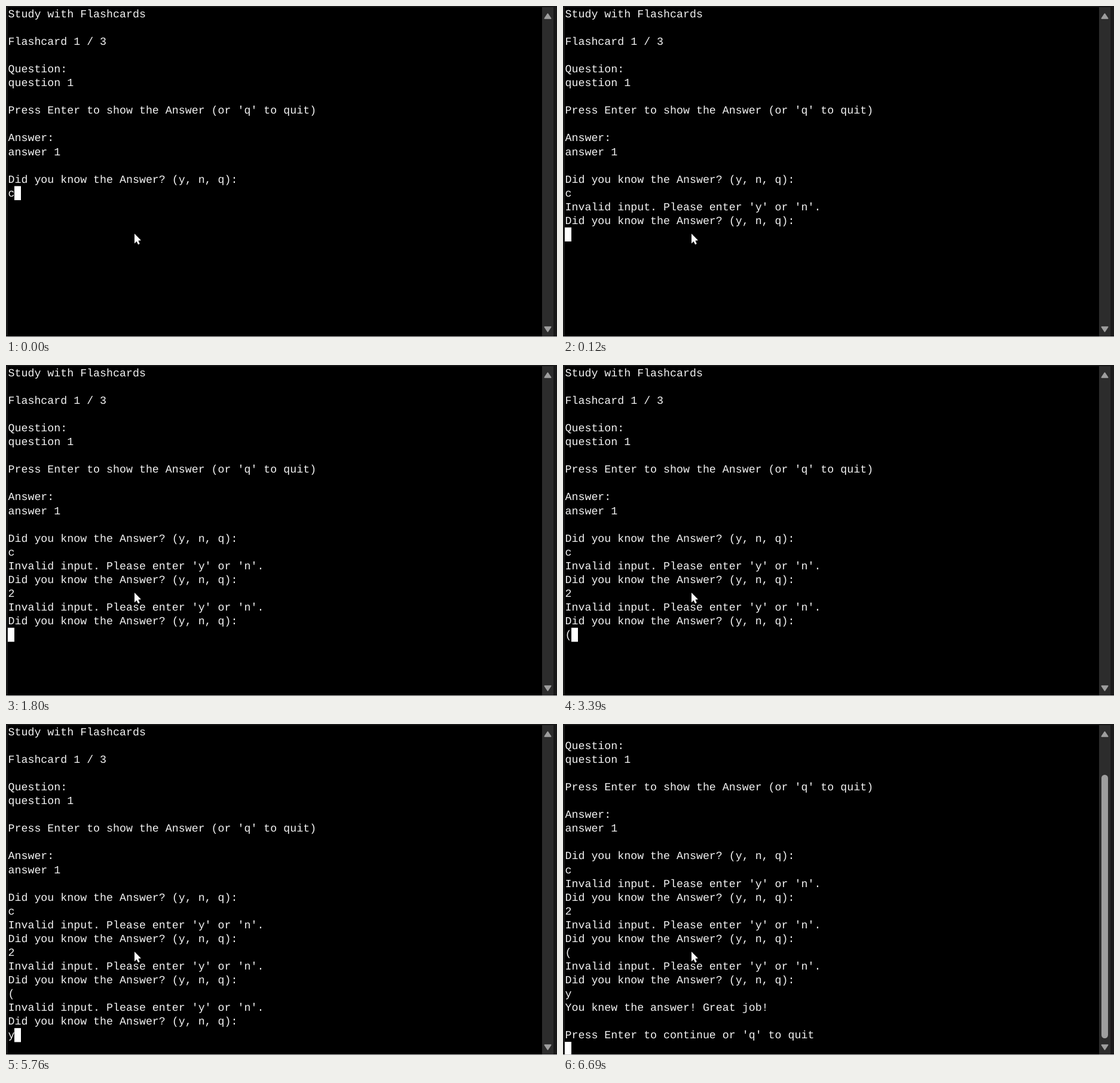
Write an HTML page that moves like this. It is 922 px wide and 554 px high and loops after 8 s.

```html
<!DOCTYPE html>
<html lang="en">
<head>
<meta charset="utf-8">
<title>Flashcards terminal</title>
<style>
  html, body { margin: 0; width: 100%; height: 100%; overflow: hidden; background: #191919; }
  svg { display: block; width: 922px; height: 554px; }
  text {
    font: 18.3px "Liberation Mono", "Courier New", monospace;
    fill: #f4f4f4;
    white-space: pre;
    text-rendering: geometricPrecision;
  }
  .arrow, #thumb { fill: #9f9f9f; }
  .arrow { stroke: #9f9f9f; stroke-width: 2; stroke-linejoin: round; }
</style>
</head>
<body>
<svg viewBox="0 0 922 554">
  <clipPath id="view"><rect x="3" y="2" width="894" height="551"/></clipPath>
  <rect x="3" y="2" width="894" height="551" fill="#000"/>
  <rect x="897" y="2" width="19" height="551" fill="#2c2c2c"/>
  <rect y="553" width="922" height="1" fill="#c8c8c8"/>
  <path class="arrow" d="M906.5 13.3 L911.5 20.8 H901.5 Z"/>
  <path class="arrow" d="M906.5 544.7 L911.5 537.2 H901.5 Z"/>
  <rect id="thumb" x="901" y="85" width="11" height="441" rx="5.5"/>
  <g clip-path="url(#view)">
    <g id="lines"></g>
    <rect id="caret" width="11" height="23.5" fill="#fff"/>
  </g>
  <path d="M215 381 V397.4 L218.6 393.9 L221.1 399.2 L223.8 398 L221.4 392.8 L226 392.3 Z"
        fill="#fff" stroke="#000" stroke-width="1" paint-order="stroke"/>
</svg>
<script>
  const LOOP = 8000, ROWS = 24, PITCH = 23.05, LEFT = 3, TOP = 1.8, BASELINE = 19, CELL = 10.98;
  const byId = id => document.getElementById(id);
  const lines = byId('lines'), caret = byId('caret'), thumb = byId('thumb');

  const ask = 'Did you know the Answer? (y, n, q):\n';
  const retry = "\nInvalid input. Please enter 'y' or 'n'.\n" + ask;
  const intro = `Study with Flashcards

Flashcard 1 / 3

Question:
question 1

Press Enter to show the Answer (or 'q' to quit)

Answer:
answer 1

${ask}`;

  // Output appended to the terminal at each time (ms)
  const output = [
    [0, intro + 'c'],
    [120, retry],
    [1520, '2'],
    [1800, retry],
    [3390, '('],
    [4230, retry],
    [5760, 'y'],
    [6690, "\nYou knew the answer! Great job!\n\nPress Enter to continue or 'q' to quit\n"]
  ];

  function textLine(content, row) {
    const el = document.createElementNS('http://www.w3.org/2000/svg', 'text');
    el.setAttribute('x', LEFT + 0.5);
    el.setAttribute('y', BASELINE + row * PITCH);
    el.textContent = content;
    return el;
  }

  function draw(count) {
    const all = output.slice(0, count).map(entry => entry[1]).join('').split('\n');
    const shown = all.slice(-ROWS);
    const row = shown.length - 1;
    lines.replaceChildren(...shown.map(textLine));
    caret.setAttribute('x', LEFT + Math.round(shown[row].length * CELL));
    caret.setAttribute('y', TOP + row * PITCH);
    thumb.style.display = all.length > ROWS ? '' : 'none';
  }

  let start, current = 1;
  draw(current);

  function tick(now) {
    start ??= now;
    const time = (now - start) % LOOP;
    const count = output.filter(entry => entry[0] <= time).length;
    if (count !== current) draw(current = count);
    requestAnimationFrame(tick);
  }
  requestAnimationFrame(tick);
</script>
</body>
</html>
```
